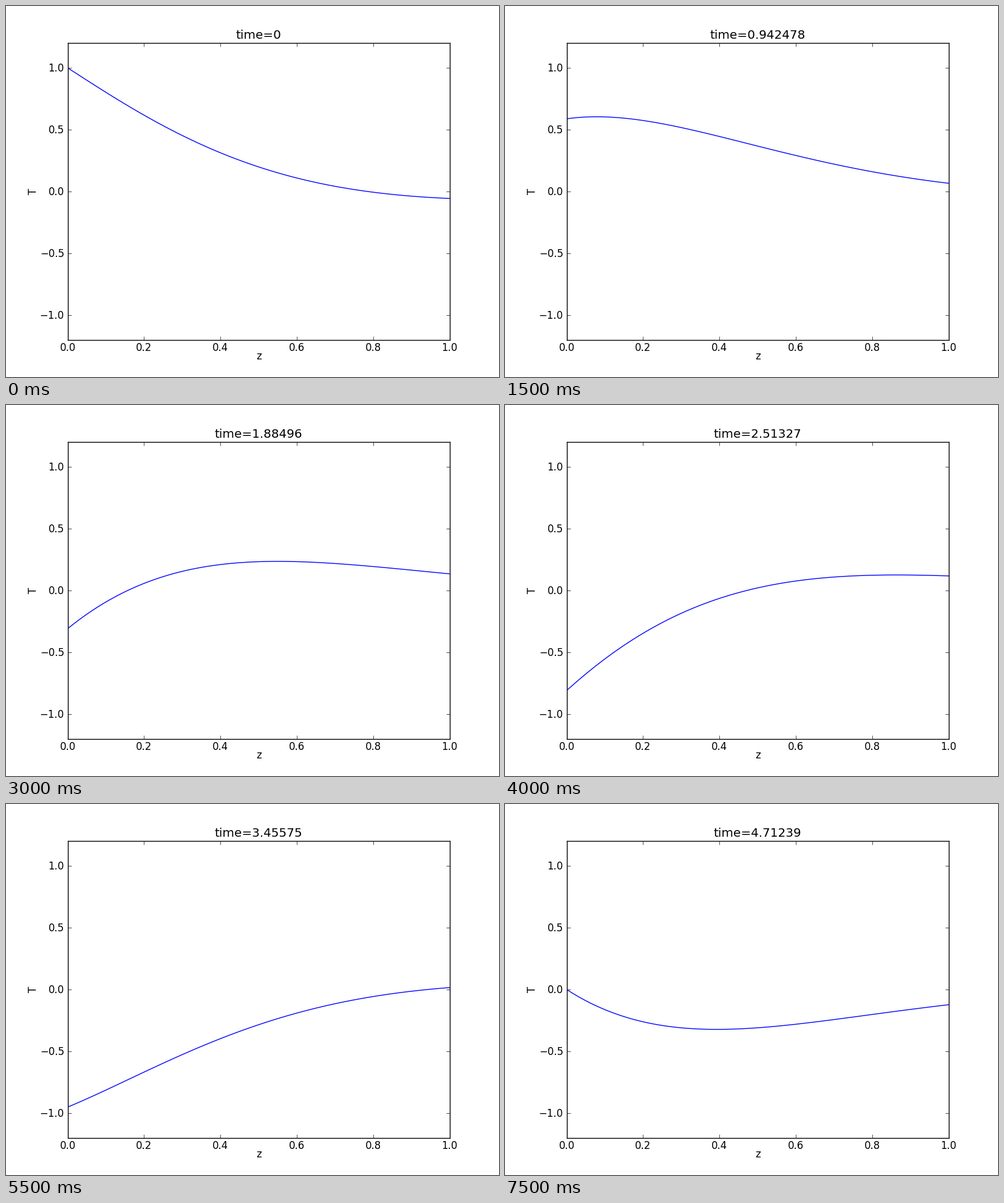
A matplotlib script for the animation above (8000 ms loop, 812x612 px).

```python
import numpy as np
import matplotlib.pyplot as plt
from matplotlib.animation import FuncAnimation

W, H, DPI = 812, 612, 100
FRAMES, STEP_MS = 16, 500
DECAY = 2.0

plt.rcParams.update({
    "font.family": "DejaVu Sans",
    "font.size": 12,
    "axes.linewidth": 1.0,
    "toolbar": "None",
})

# The tiny surplus keeps the pixel size from being truncated downwards.
fig = plt.figure(figsize=((W + 0.001) / DPI, (H + 0.001) / DPI), dpi=DPI,
                 facecolor="white")
ax = fig.add_axes([0.125, 0.1, 0.775, 0.8])
ax.set(xlim=(0, 1), ylim=(-1.2, 1.2))

xticks = np.linspace(0, 1, 6)
yticks = np.linspace(-1, 1, 5)
ax.set_xticks(xticks)
ax.set_yticks(yticks)
ax.tick_params(direction="in", length=4, width=0.5, top=True, right=True,
               labelbottom=False, labelleft=False)


def put(x, y, s, **kw):
    """Text with its baseline at pixel (x, y), y counted from the top."""
    kw = {"ha": "center", "va": "baseline", **kw}
    return fig.text(x / W, 1 - y / H, s, **kw)


def label(v):
    return f"{v:.1f}".replace("-", "\u2212")


for v in xticks:
    put(W * (0.125 + 0.775 * v), 569.4, label(v))
for v in yticks:
    put(95.95, H * (0.5 - v / 3) + 6, label(v), ha="right")

put(416.15, 583.4, "z")
put(50.4, 306, "T", rotation=90, rotation_mode="anchor")
title = put(416.15, 54.26, "", fontsize=14.4)

z = np.linspace(0, 1, 101)
curve, = ax.plot(z, np.zeros_like(z), color="#0000ff", lw=1.0)


def update(i):
    t = i * np.pi / 10
    curve.set_ydata(np.exp(-DECAY * z) * np.cos(t - DECAY * z))
    title.set_text(f"time={t:g}")
    return curve, title


anim = FuncAnimation(fig, update, frames=FRAMES, interval=STEP_MS,
                     repeat=True, repeat_delay=0, blit=False)
plt.show()
```
